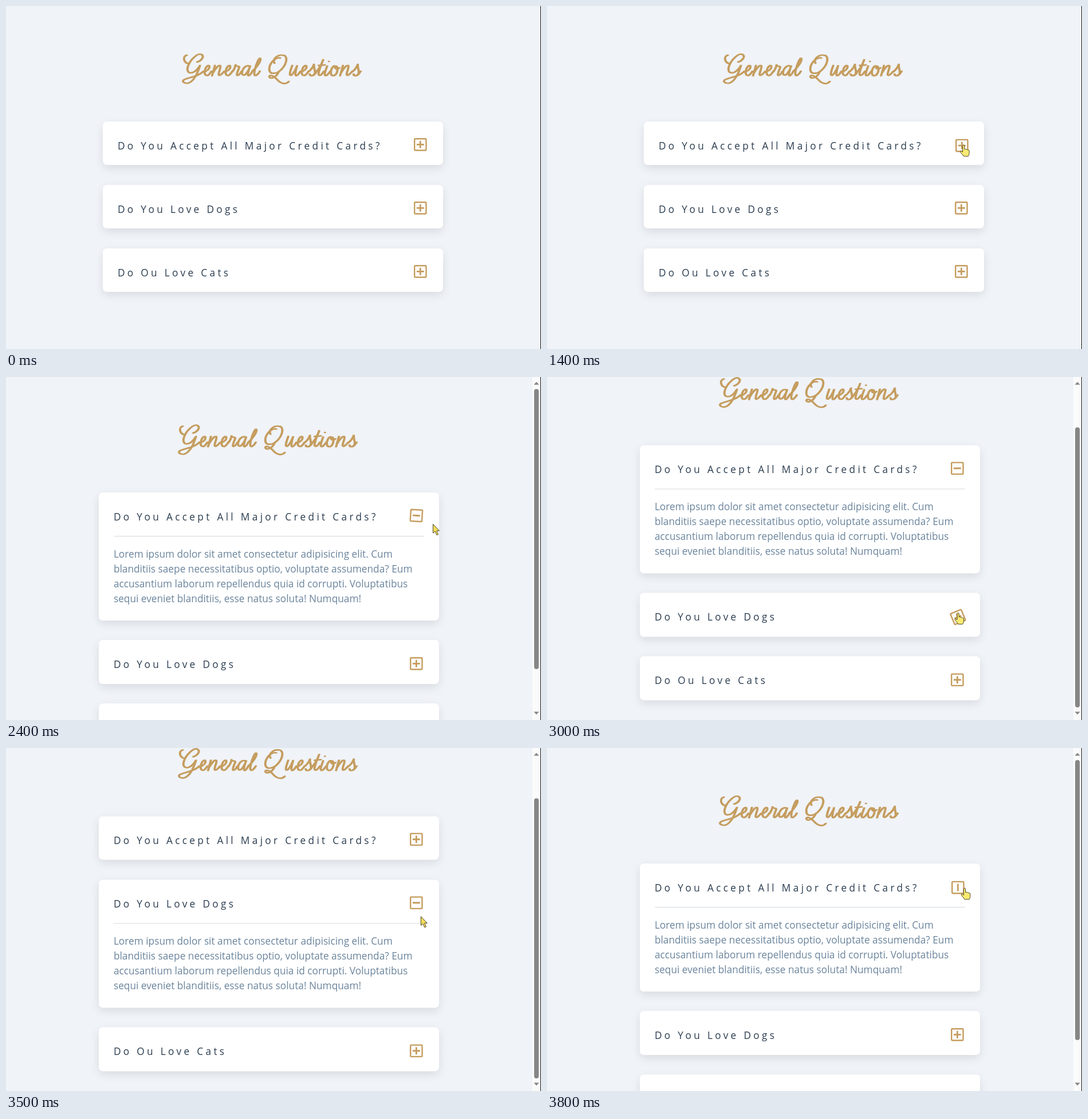
An HTML page that plays this animation: 934 px wide and 600 px high, repeating every 3900 ms.

```html
<!DOCTYPE html>
<html lang="en">
<head>
<meta charset="utf-8">
<title>General Questions</title>
<style>
  html, body { margin: 0; width: 100%; height: 100%; overflow: hidden; background: #f0f3f8; }
  body { position: relative; font: 17.28px/25.92px "Open Sans", "Noto Sans", sans-serif; }
  svg { display: block; overflow: visible; }
  #stage { position: absolute; left: 0; top: 0; width: 934px; height: 600px; overflow: hidden; }
  #page, .card, .card > *, #title, #bar, #bar > *, #edge, #cursor { position: absolute; }
  #page { left: 0; top: 0; width: 594px; }
  #title { left: 0; top: 0; fill: none; stroke: #c59d5f; stroke-width: 2.4; stroke-linecap: round; stroke-linejoin: round; }
  .card { left: 0; width: 594px; height: 76.5px; border-radius: 7px; background: #fff; box-shadow: 0 5.4px 16.2px rgba(0, 0, 0, .1); }
  .card.open { height: 224px; }
  .card h4 { left: 25.9px; top: 30px; margin: 0; font: inherit; letter-spacing: 4.32px; white-space: nowrap; color: #2a3c4f; }
  .card p { left: 25.9px; top: 76px; width: 542.2px; margin: 0; padding-top: 18.3px; border-top: 1px solid #d5dade; white-space: pre; color: #6a849c; box-sizing: border-box; display: none; }
  .card.open p { display: block; }
  .icon { left: 543.15px; top: 29.65px; width: 22.7px; height: 22.7px; transform-origin: 11px 12.7px; fill: #c59d5f; }
  .icon rect:first-child { fill: none; stroke: #c59d5f; stroke-width: 2.43; }
  .card.open .bar { display: none; }
  #bar { left: 919px; top: 0; width: 14px; height: 600px; background: #fbfbfc; }
  #thumb { left: 3px; width: 8px; height: 490px; border-radius: 4px; background: #868686; }
  #edge { left: 933px; top: 0; width: 1px; height: 600px; background: #111; }
  #cursor { left: 0; top: 0; stroke: #4d4524; stroke-width: 1; stroke-linejoin: round; }
</style>
</head>
<body>
<div id="stage">
  <div id="page">
    <svg id="title" width="594" height="150" role="img" aria-label="General Questions"></svg>
  </div>
  <div id="bar">
    <svg width="14" height="600" fill="#858585"><path d="M2.5 13.5L7 8.5L11.5 13.5ZM2.5 585.5L7 590.5L11.5 585.5Z"/></svg>
    <div id="thumb"></div>
  </div>
  <div id="edge"></div>
  <svg id="cursor" width="20" height="24"><path/></svg>
</div>
<script>
const LOOP = 3900, STEP = 100;
const $ = id => document.getElementById(id);

// Script lettering: advance width and pen path, baseline at y = 0
const glyphs = {
  G: [37, 'M12 -21C2 -22 0 -34 8 -36M26 -24C33 -26 39 -33 34 -37C28 -41 12 -28 9 -13C8 -2 20 -2 29 -15L31 -18C27 -5 21 10 10 13C2 14 -1 9 3 7C10 3 28 2 37 -8'],
  Q: [35, 'M20 -31C10 -33 0 -20 1 -10C2 -2 14 -2 23 -12C32 -22 34 -36 24 -36C14 -37 6 -28 10 -22M17 -6C12 4 3 6 1 2C1 -3 9 0 14 6C20 13 29 17 35 10'],
  e: [14, 'M0 -6C5 -8 11 -12 10.5 -16.5C10 -20 4 -17 2.5 -9C1 -2 4 0 7 -.5C10 -1.5 12 -5 14 -8'],
  n: [22.5, 'M6 -18L1 0M2 -4C7 -13 13 -20 15.5 -17.5C17 -15 12 -6 12.5 -2C13.5 2 19 -4 22.5 -8'],
  r: [16, 'M0 -7C3 -11 5 -15 5.5 -19C6 -15 12 -18 12 -15C10 -9 7 -4 8 -1C10 1 14 -4 16 -8'],
  a: [19, 'M14 -16C12 -20 3 -16 1 -7C0 0 5 1 9 -5C12 -9 14 -13 15 -17C12 -9 10 -3 11.5 -.5C13 1.5 17 -4 19 -8'],
  l: [13, 'M0 -8C7 -14 15 -25 14 -30C12 -33 7 -22 4 -10C2 -1 4 1 7 -1C10 -3 12 -6 13 -8'],
  u: [20.5, 'M6 -18C4 -12 1 -5 2 -1.5C4 2 10 -6 14.5 -17.5C12 -9 10.5 -3 12 -.5C14 1.5 18 -4 20.5 -8'],
  s: [14.5, 'M0 -7C5 -11 8 -16 9.5 -20C8 -14 13 -9 10.5 -3C8 1 2 1 2 -3M11 -3L14.5 -8'],
  t: [12.5, 'M0 -8C5 -14 9 -22 11 -28C8 -20 2 -7 3 -2C5 2 10 -4 12.5 -8M3 -18L14 -19'],
  i: [11, 'M5.5 -17C3 -10 0 -4 1.5 -1C4 2 8 -4 11 -8M8.5 -25h.2'],
  o: [16, 'M9 -17C4 -19 0 -9 1 -4C2 2 9 1 11.5 -6C14 -14 11 -19 8 -16C8 -11 13 -11 16 -14']
};

function word(text, x) {
  return [...text].map(ch => {
    const [w, d] = glyphs[ch];
    const out = [0, 1.5].map(dx => `<path transform="translate(${x + dx} 122)" d="${d}"/>`).join('');
    x += w;
    return out;
  }).join('');
}
$('title').innerHTML = word('General', 138) + word('Questions', 289);

const answer = `Lorem ipsum dolor sit amet consectetur adipisicing elit. Cum
blanditiis saepe necessitatibus optio, voluptate assumenda? Eum
accusantium laborum repellendus quia id corrupti. Voluptatibus
sequi eveniet blanditiis, esse natus soluta! Numquam!`;

const icon = `<svg class="icon" viewBox="0 0 22.7 22.7">
  <rect x="1.2" y="1.2" width="20.3" height="20.3" rx="1.2"/>
  <rect x="4.85" y="9.95" width="13" height="2.8" rx=".6"/>
  <rect class="bar" x="9.95" y="4.85" width="2.8" height="13" rx=".6"/></svg>`;

const cards = ['Do You Accept All Major Credit Cards?', 'Do You Love Dogs', 'Do Ou Love Cats'].map(q => {
  const el = document.createElement('div');
  el.className = 'card';
  el.innerHTML = `<h4>${q}</h4>${icon}<p>${answer}</p>`;
  $('page').append(el);
  return el;
});

const arrow = 'M.5 .5V16L4 13L7 19.5L9.6 18.4L6.8 12H11.5Z';
const hand = 'M-1.6 1.5Q0 -.5 1.6 1.5V8Q3 6.8 4.2 8.4Q5.8 7.4 7 9.2Q9 8.4 9.8 10.5V15Q9.8 18 8 20.3H.2Q-1.5 17.5 -4.5 14.5Q-6.5 12 -5.4 11Q-4 10.2 -1.6 13Z';

// Cursor hotspot: time, x, y
const track = [
  [500, 640, 330], [1000, 703, 224], [1100, 722, 238], [1500, 729, 244],
  [1700, 727, 245], [2000, 727, 245], [2400, 745, 257], [2600, 742, 330],
  [2900, 718, 412], [3200, 717, 412], [3300, 715.5, 365], [3600, 728, 259],
  [3700, 729, 247], [3800, 729, 244.5]
];
const hovers = [[[1100, 2240], [3600, 4200]], [[2900, 3300]], []];

const clamp = v => Math.min(1, Math.max(0, v));
const easeOut = v => 1 - (1 - clamp(v)) ** 2;
const within = (t, a, b) => t >= a && t < b;

function cursorAt(t) {
  const i = track.findIndex(k => k[0] > t);
  if (i < 0) return track[track.length - 1].slice(1);
  const [a, b] = [track[i - 1], track[i]];
  const p = (t - a[0]) / (b[0] - a[0]);
  return [1, 2].map(n => a[n] + (b[n] - a[n]) * p);
}

const turn = (spans, t) => 90 * spans.reduce(
  (sum, [a, b]) => sum + easeOut((t - a) / 200) - easeOut((t - b) / 200), 0);

function draw(t) {
  const open = t < 1700 ? -1 : t < 3100 ? 0 : t < 3800 ? 1 : 0;
  const scroll = t < 3700 ? 82.6 * easeOut((t - 2650) / 250) : 0;
  const long = open >= 0;

  $('page').style.transform = `translate(${long ? 162 : 169}px, ${-scroll}px)`;
  $('bar').style.display = long ? '' : 'none';
  $('thumb').style.top = 21 + scroll * 67 / 82.6 + 'px';

  let y = 201.6;
  cards.forEach((el, i) => {
    el.classList.toggle('open', i === open);
    el.style.top = y + 'px';
    el.querySelector('.icon').style.transform = `rotate(${turn(hovers[i], t)}deg)`;
    y += i === open ? 258.6 : 111.1;
  });

  const cursor = $('cursor');
  cursor.style.display = t < 500 ? 'none' : '';
  if (t < 500) return;
  const [cx, cy] = cursorAt(t);
  const pointing = within(t, 1100, 2200) || within(t, 2900, 3400) || t >= 3700;
  const shape = cursor.firstElementChild;
  cursor.style.transform = `translate(${cx}px, ${cy}px)`;
  shape.setAttribute('d', pointing ? hand : arrow);
  shape.setAttribute('fill', within(t, 1700, 2100) ? '#c9b044' : pointing ? '#fbea72' : '#f2dd5c');
}

function tick() {
  const t = performance.now() % LOOP;
  draw(Math.floor(t / STEP) * STEP);
  requestAnimationFrame(tick);
}
tick();
</script>
</body>
</html>
```
